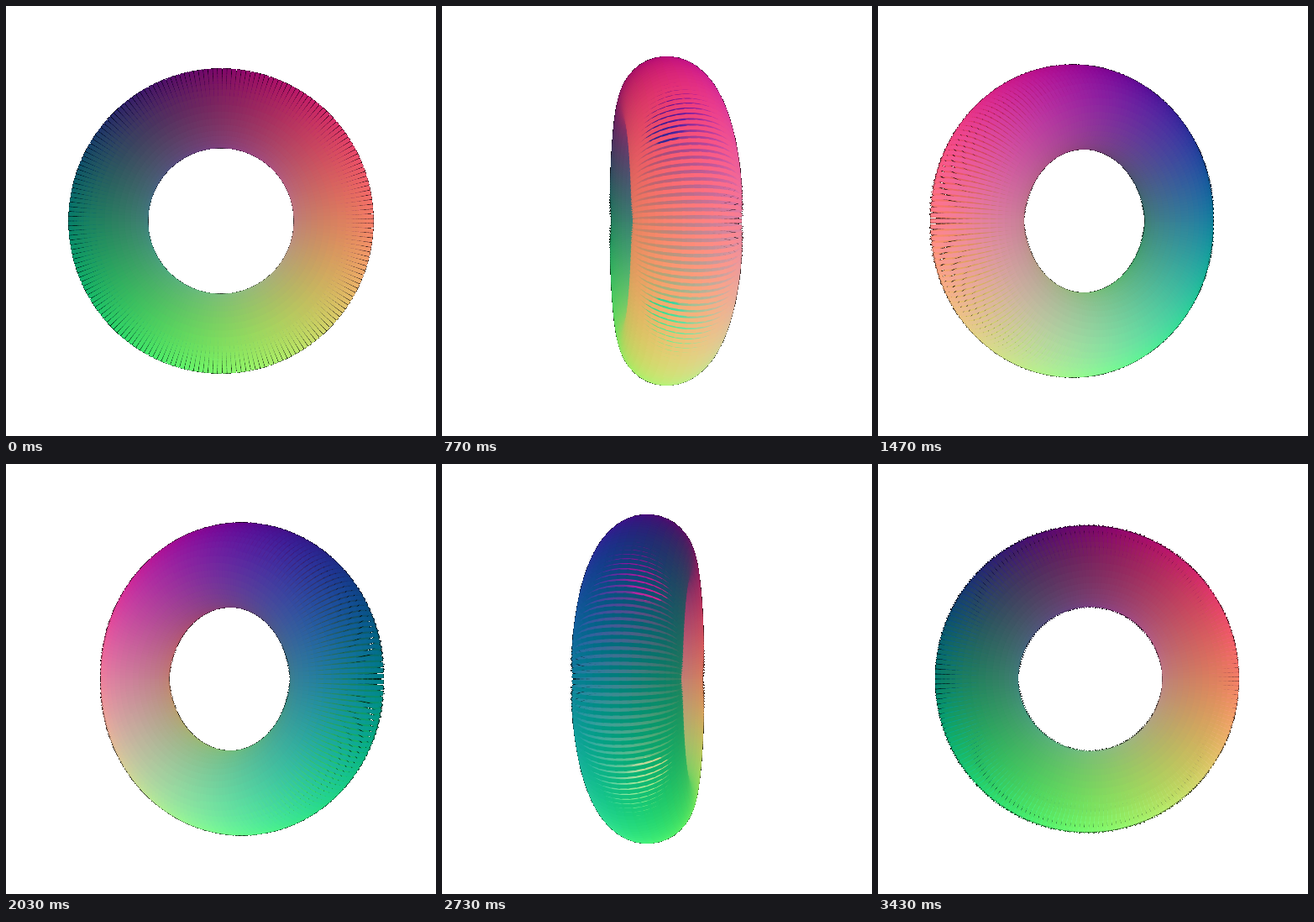
Animation of 512 by 512 pixels, one loop 3.5 s. Source, as an HTML page with a canvas:

```html
<!DOCTYPE html>
<html lang="en">
<head>
<meta charset="utf-8">
<title>Turning ring</title>
<style>
  html, body { margin: 0; width: 100%; height: 100%; overflow: hidden; background: #fff; }
  canvas { display: block; width: 512px; height: 512px; }
</style>
</head>
<body>
<canvas id="stage" width="512" height="512"></canvas>
<script>
const SIZE = 512, HALF = SIZE / 2, TAU = Math.PI * 2;
const STEP = 70, STEPS = 50;
const RINGS = 199, SEGS = 40;
const MAJOR = 132.8, MINOR = 45, OUTER = MAJOR + MINOR;
const EYE = HALF / Math.tan(Math.PI / 6);
const WIDTH = 4.7, OVERLAP = 0.15, MIN_ALPHA = 32;

const ctx = document.getElementById('stage').getContext('2d', { willReadFrequently: true });

function torusPoint(ring, seg) {
  const a = ring / RINGS * TAU, b = seg / SEGS * TAU;
  const d = MAJOR + MINOR * Math.cos(b);
  return [d * Math.cos(a), d * Math.sin(a), MINOR * Math.sin(b)];
}

// Colour follows the position inside the ring's own space.
function tint([x, y, z]) {
  const level = v => Math.round(127.5 + 127.5 * v / OUTER);
  return `rgb(${level(x)},${level(y)},${level(-z)})`;
}

const parts = [];
for (let i = 0; i < RINGS; i++) {
  for (let j = 0; j < SEGS; j++) {
    parts.push({
      from: torusPoint(i, j),
      to: torusPoint(i, j + 1),
      color: tint(torusPoint(i, j + 0.5)),
      depth: 0
    });
  }
}

function project([x, y, z], cos, sin) {
  const depth = x * sin + z * cos;
  const k = EYE / (EYE - depth);
  return [HALF + (x * cos - z * sin) * k, HALF + y * k, depth];
}

// Soft edges fade to black; untouched pixels become white.
function flatten() {
  const img = ctx.getImageData(0, 0, SIZE, SIZE), px = img.data;
  for (let i = 0; i < px.length; i += 4) {
    const alpha = px[i + 3];
    if (alpha < MIN_ALPHA) {
      px[i] = px[i + 1] = px[i + 2] = 255;
    } else if (alpha < 255) {
      const k = alpha / 255;
      px[i] *= k;
      px[i + 1] *= k;
      px[i + 2] *= k;
    }
    px[i + 3] = 255;
  }
  ctx.putImageData(img, 0, 0);
}

function draw(step) {
  const turn = step / STEPS * TAU, cos = Math.cos(turn), sin = Math.sin(turn);
  for (const p of parts) {
    p.a = project(p.from, cos, sin);
    p.b = project(p.to, cos, sin);
    p.depth = p.a[2] + p.b[2];
  }
  parts.sort((p, q) => p.depth - q.depth);

  ctx.clearRect(0, 0, SIZE, SIZE);
  ctx.lineWidth = WIDTH;
  for (const { a, b, color } of parts) {
    const dx = (b[0] - a[0]) * OVERLAP, dy = (b[1] - a[1]) * OVERLAP;
    ctx.strokeStyle = color;
    ctx.beginPath();
    ctx.moveTo(a[0] - dx, a[1] - dy);
    ctx.lineTo(b[0] + dx, b[1] + dy);
    ctx.stroke();
  }
  flatten();
}

const start = performance.now();
let shown = -1;

function tick() {
  const step = Math.floor((performance.now() - start) / STEP) % STEPS;
  if (step !== shown) draw(shown = step);
  requestAnimationFrame(tick);
}
tick();
</script>
</body>
</html>
```
